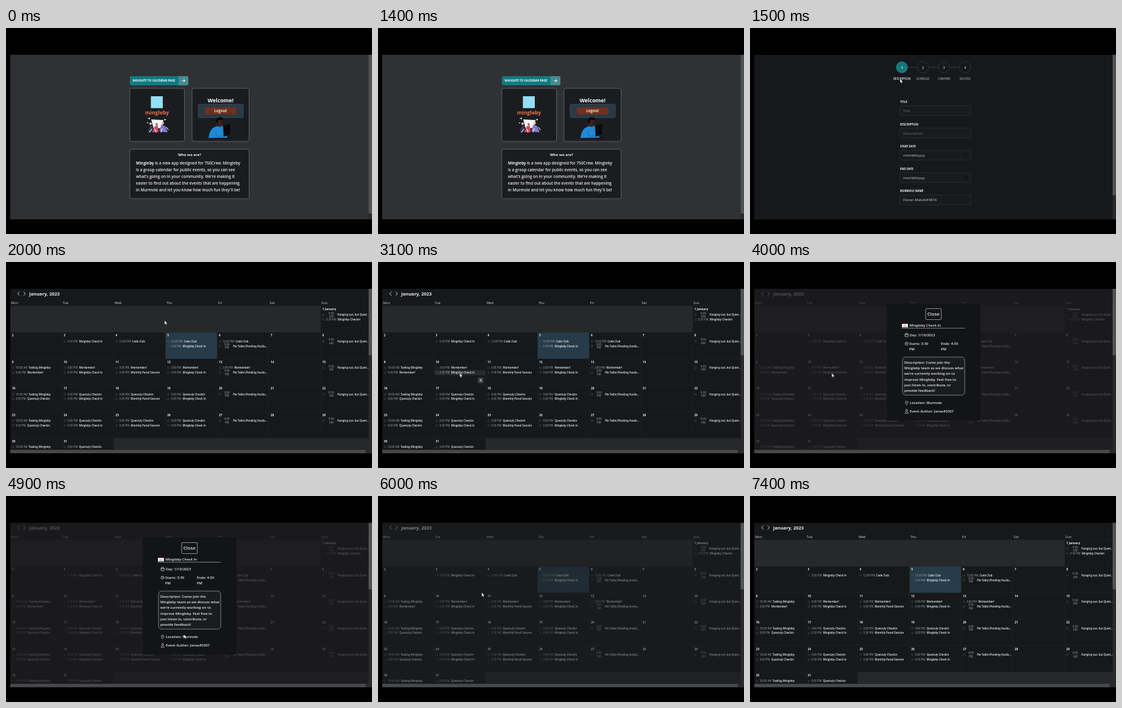
These frames come from a looping animation (600x338 px, 7.6 s). An HTML page:

```html
<!DOCTYPE html>
<html lang="en">
<head>
<meta charset="utf-8">
<title>Calendar demo</title>
<style>
html, body { margin: 0; width: 100%; height: 100%; overflow: hidden; background: #000; }
svg { display: block; width: 600px; height: 338px; font-family: "Open Sans", "Noto Sans", sans-serif; }
text { white-space: pre; }
</style>
</head>
<body>
<svg id="stage" viewBox="0 0 600 338"></svg>
<script>
const rect = (x, y, w, h, fill, stroke = 'none', r = 0, sw = .7) =>
  `<rect x="${x}" y="${y}" width="${w}" height="${h}" rx="${r}" fill="${fill}" stroke="${stroke}" stroke-width="${sw}"/>`;
const path = (d, fill, stroke = 'none', sw = 1) =>
  `<path d="${d}" fill="${fill}" stroke="${stroke}" stroke-width="${sw}" stroke-linejoin="round" stroke-linecap="round"/>`;
const dot = (x, y, r, fill, stroke = 'none', more = '') =>
  `<circle cx="${x}" cy="${y}" r="${r}" fill="${fill}" stroke="${stroke}" stroke-width=".7" ${more}/>`;
// y is the middle of the capital letters
const text = (x, y, size, str, weight = 600, fill = '#ececec', anchor = 'start') =>
  `<text x="${x}" y="${y + size * .36}" font-size="${size}" font-weight="${weight}" fill="${fill}" text-anchor="${anchor}">${str}</text>`;
const mid = (x, y, size, str, weight, fill) => text(x, y, size, str, weight, fill, 'middle');
const lines = (x, y, step, size, list) => list.map((s, i) => text(x, y + i * step, size, s)).join('');
const group = (id, body) => `<g id="${id}">${body}</g>`;
const scrollbar = bottom => rect(594.5, 44, 5.5, 270, '#2a2a2c') + rect(594.5, 44, 5.5, bottom - 44, '#515254');

function crowd() {
  return path('M238 150 L258 151 L256 164 L242 165 Z', '#f4f4f6') +
    path('M232 148 l4 -1 v3 z M259 149 l4 1 -3 2 z M230 155 l3 0 0 2 z', '#dcdce4') +
    path('M232 170 L237 159 L242 163 L240 171 Z', '#34345c') +
    path('M240 171 L244 161 L249 160 L250 171 Z', '#d9485c') +
    path('M251 169 L255 158 L261 161 L265 171 L260 171 Z', '#7d78c8') +
    path('M235 171 l4 -5 M246 171 l-2 -5 M254 171 l2 -6 M263 163 l3 4', 'none', '#f0f0f4', 1.2) +
    dot(237, 157, 2, '#e9b9a4') + dot(247, 158, 1.8, '#8a4b3c') + dot(257, 156, 2, '#e9b9a4');
}

function reader() {
  return path('M332 181 Q333 166 343 162 L351 159 Q358 161 359 167 L363 180 Z', '#1e8ad6') +
    path('M343 170 L347 178 L361 176', 'none', '#12629f', .8) +
    path('M345 157 L354 156 L353 162 L347 162 Z', '#3a211b') +
    dot(350, 153, 4.4, '#3a211b') +
    path('M344 154 Q344 146 351 146 Q357 147 356 151 L348 151 L347 156 Z', '#08090b') +
    path('M356 160 L369 156 L368 175 L357 178 Z', '#0a0b0d', '#30343a', .5) +
    path('M334 181 H369', 'none', '#0a0b0d', 1);
}

function landing() {
  const card = (x, y, w, h) => rect(x, y, w, h, '#1b1c1f', '#76777a', 3);
  const para = ['<tspan font-weight="700">Mingleby</tspan> is a new app designed for 750Crew. Mingleby',
    'is a group calendar for public events, so you can see',
    'what\'s going on in your community. We\'re making it',
    'easier to find out about the events that are happening',
    'in Murmole and let you know how much fun they\'ll be!'];
  return rect(7, 44, 588, 270, '#303134') + scrollbar(304.5) +
    rect(203, 79, 96, 15, '#0d7c80', 'none', 3) +
    path('M283 79 H296 Q299 79 299 82 V91 Q299 94 296 94 H283 Z', '#458c8f') +
    text(207.5, 86.6, 4.7, 'NAVIGATE TO CALENDAR PAGE', 700, '#fff') +
    path('M288.6 86.5 H293.4 M291.3 84.2 L293.6 86.5 L291.3 88.8', 'none', '#fff', .9) +
    card(203, 99, 89.5, 87) + card(305, 99, 93.5, 87) + card(203, 199, 195.5, 81) +
    rect(237.5, 112, 19.5, 19.5, '#95dff4') +
    mid(247.5, 138.5, 8.5, 'mingleby', 700, '#e8704f') + crowd() +
    mid(351.7, 118.5, 8.8, 'Welcome!', 700, '#fff') +
    rect(315, 125, 74, 22, '#293945', '#40586a', 2) +
    rect(326, 130, 52, 12, '#6c3120', 'none', 2) + mid(351.7, 136, 6.1, 'Logout', 700, '#f0dcd4') + reader() +
    mid(301, 207.7, 6, 'Who we are?', 700, '#f2f2f2') + lines(213, 222, 10.9, 6.5, para);
}

function form() {
  const steps = ['DESCRIPTION', 'SCHEDULE', 'CONFIRM', 'SUCCESS'];
  const fields = [['TITLE', 'Title'], ['DESCRIPTION', 'Description'], ['START DATE', 'mm/dd/yyyy'],
    ['END DATE', 'mm/dd/yyyy'], ['MURMOLE NAME', 'Doren Malvik#4816']];
  return rect(7, 44, 588, 270, '#17181b') + scrollbar(274.5) +
    path('M249 64.4 H352', 'none', '#454b4d', .7) +
    steps.map((s, i) => {
      const x = 249 + i * 34.5;
      return dot(x, 64.4, 9.2, i ? '#17181b' : '#11797c', i ? '#4b5254' : '#4aa3a3', 'stroke-dasharray="1.5 .7"') +
        mid(x, 64.6, 5.6, i + 1, 700, i ? '#58c4ae' : '#fff') +
        mid(x, 83, 4.35, s, 600, i ? '#a4a6aa' : '#f4f4f4');
    }).join('') +
    fields.map(([label, value], i) => {
      const y = 127.7 + i * 36.55;
      return text(246, y - 6.2, 4.5, label, 700, '#f4f4f4') + rect(246, y, 116, 16, '#191a1d', '#343639', 1.5) +
        text(251, y + 8.2, 6.1, value, 400, i < 2 ? '#707176' : '#d0d1d3') +
        (i == 2 || i == 3 ? rect(351, y + 5.5, 4.5, 4.5, 'none', '#0b0b0d') : '');
    }).join('');
}

const colX = c => 7 + c * 84.8;
const rowY = r => 72 + r * 43.4;
const kinds = {
  h: ['9:30 AM', 'Hanging out, but Quiet...', 1],
  m: ['3:30 PM', 'Mingleby Checkin'],
  s: ['3:30 PM', 'Mingleby Check In'],
  c: ['12:00 PM', 'Code Club'],
  p: ['3:00 PM', 'Pie Table (Pending Availa...', 1],
  t: ['10:00 AM', 'Tasklog Mingleby'],
  w: ['3:00 PM', 'Workember!'],
  q: ['3:00 PM', 'Questuly Checkin'],
  n: ['3:30 PM', 'Monthly Panel Session']
};
const weeks = ['- - - - - - hm', '- s c cs cp - h', 'tw ws wn ws wp - h',
  'tq qs qn qs p - h', 'tq qs qn qs p - h', 't q'];

function entry(x, y, [time, title, wrap]) {
  const gray = '#a6a7aa', size = 4.5, mark = dot(x + 4.6, y, 1.5, 'none', '#4a4b4e');
  if (!wrap) return mark + text(x + 8.8, y, size, time, 400, gray) + text(x + (time.length > 7 ? 30 : 28), y, 4.4, title);
  const [a, b] = time.split(' '), far = x > 500 ? 1.5 : 0;
  return mark + mid(x + 16 + far, y - 2.7, size, a, 400, gray) + mid(x + 16 + far, y + 2.8, size, b, 400, gray) +
    text(x + 26 + far, y, 4.4, title);
}

function calendar() {
  let out = rect(7, 44, 588, 270, '#16181a') +
    rect(7, 72, 509, 43.4, '#27282a') + rect(colX(2), rowY(5), 420, 20, '#27282a') +
    rect(colX(3), rowY(1), 84.8, 43.4, '#263c4a');
  for (let r = 0; r < 6; r++) out += path(`M7 ${rowY(r)} H595`, 'none', '#25272a', .5);
  for (let c = 1; c < 7; c++) out += path(`M${colX(c)} 72 V308`, 'none', '#25272a', .5);
  out += path('M22 49 L19 52 L22 55 M29 49 L32 52 L29 55', 'none', '#d8d8d8', .9) +
    text(38, 52.4, 7.5, 'January, 2023', 700);
  'Mon Tue Wed Thu Fri Sat Sun'.split(' ').forEach((d, c) => out += text(colX(c) + 1.3, 67, 5.6, d, 400, '#d4d4d6'));
  out += group('hover', rect(93, 177.3, 83, 8.6, '#292a2d') + rect(164, 189.5, 8.7, 9.3, '#414244', 'none', 1) +
    path('M166.6 194.1 H170.2 M168.4 192.3 V195.9', 'none', '#e0e0e0', .8));
  for (let day = 1; day < 32; day++) {
    const cell = day + 5;
    out += text(colX(cell % 7) + 2.8, rowY(Math.floor(cell / 7)) + 5.3, 4.8, day > 1 ? day : '1 January', 700);
  }
  weeks.forEach((week, r) => week.split(' ').forEach((keys, c) => [...keys].forEach((k, i) => {
    if (kinds[k]) out += entry(colX(c), rowY(r) + 14.8 + i * 7.8, kinds[k]);
  })));
  return out + group('shade', rect(7, 44, 588, 264, '#1b1c1e')) + scrollbar(153) +
    rect(7, 308, 588, 6, '#2a2a2c') + rect(7, 308.3, 582.5, 5.2, '#48494b');
}

function modal() {
  const about = ['Description: Come join the', 'Mingleby team as we discuss what', 'we\'re currently working on to',
    'improve Mingleby. Feel free to', 'just listen in, contribute, or', 'provide feedback!'];
  const ink = '#e4e4e4';
  return rect(224, 68, 154, 192, '#131417', 'none', 2) +
    rect(288, 76.5, 25.5, 18, 'none', '#c4c4c4', 1.5) + mid(300.7, 85.6, 7.7, 'Close') +
    rect(249, 101, 10, 6.2, '#eeeeee') + rect(249, 101, 10, 1, '#d0646a') + rect(251.5, 104.6, 5, 1, '#5aa588') +
    text(261.5, 104.2, 5.9, 'Mingleby Check In') + path('M249 108.6 H352', 'none', '#b4b4b4', .7) +
    rect(254.2, 117.7, 5, 5, 'none', ink, .6) + path('M254.2 119.4 H259.2 M255.6 117 V118.2 M257.8 117 V118.2', 'none', ink, .6) +
    text(261.7, 120.3, 5.8, 'Day: 1/10/2023') +
    dot(256.6, 134, 2.5, 'none', ink) + path('M256.6 132.4 V134.2 H257.9', 'none', ink, .6) +
    lines(261, 134.2, 9.2, 5.8, ['Starts: 3:30', 'PM']) + lines(313, 134.2, 9.2, 5.8, ['Ends: 4:30', 'PM']) +
    rect(250, 156, 102, 62.4, '#1b1c1f', '#a8a8a8', 5) + lines(253, 164.4, 9.34, 5.85, about) +
    path('M256.7 234 Q252 229 256.7 228.2 Q261.4 229 256.7 234 Z', 'none', ink, .6) + dot(256.7, 230.4, .6, ink) +
    text(262, 231.3, 5.8, 'Location: Murmole') +
    dot(256.7, 243.2, 1.5, 'none', ink) + path('M254.2 248 Q254.2 245.7 256.7 245.7 Q259.2 245.7 259.2 248 Z', 'none', ink, .6) +
    text(262, 245.3, 5.8, 'Event Author: Jonas#5307');
}

const stage = document.getElementById('stage');
stage.innerHTML = '<clipPath id="view"><rect x="7" y="44" width="593" height="270"/></clipPath><g clip-path="url(#view)">' +
  group('landing', landing()) + group('form', form()) + group('calendar', calendar()) + group('modal', modal()) +
  group('cursor', path('M0 0 V6.4 L1.5 5.1 L2.6 7.5 L3.7 7 L2.6 4.7 H4.6 Z', '#fff', '#111', .4)) + '</g>';

const el = id => document.getElementById(id);
const show = (id, on) => el(id).style.display = on ? '' : 'none';
const clamp = v => Math.max(0, Math.min(1, v));

// cursor stops: time, x, y
const stops = [[1500, 246, 83.5], [1800, 246, 83.5], [2400, 300, 132], [3000, 134, 182.5], [4300, 134, 182.5],
  [4700, 314, 240], [4800, 314, 240], [5200, 170, 158.5], [6200, 170, 158.5]];

function cursorAt(t) {
  const i = Math.max(1, stops.findIndex(s => s[0] >= t));
  const [t0, x0, y0] = stops[i - 1], [t1, x1, y1] = stops[i];
  const u = clamp((t - t0) / (t1 - t0)), k = u * u * (3 - 2 * u);
  return [x0 + (x1 - x0) * k, y0 + (y1 - y0) * k];
}

function draw(now) {
  const t = Math.floor(now % 7600 / 100) * 100; // ten steps per second
  show('landing', t < 1500);
  show('form', t == 1500);
  show('calendar', t >= 1600);
  show('hover', t >= 2900 && t < 3600);
  const open = t < 3600 ? 0 : clamp((t - 3500) / 300);
  const fade = end => clamp((end - t) / 220);
  const shade = t < 3000 ? fade(1750) : t < 5900 ? open : fade(6150);
  el('shade').style.opacity = shade * .74;
  show('modal', open > 0 && t < 6000);
  el('modal').style.opacity = open;
  const visible = t >= 1500 && t < 6200;
  show('cursor', visible);
  if (visible) el('cursor').setAttribute('transform', `translate(${cursorAt(t)})`);
  requestAnimationFrame(draw);
}
requestAnimationFrame(draw);
</script>
</body>
</html>
```
